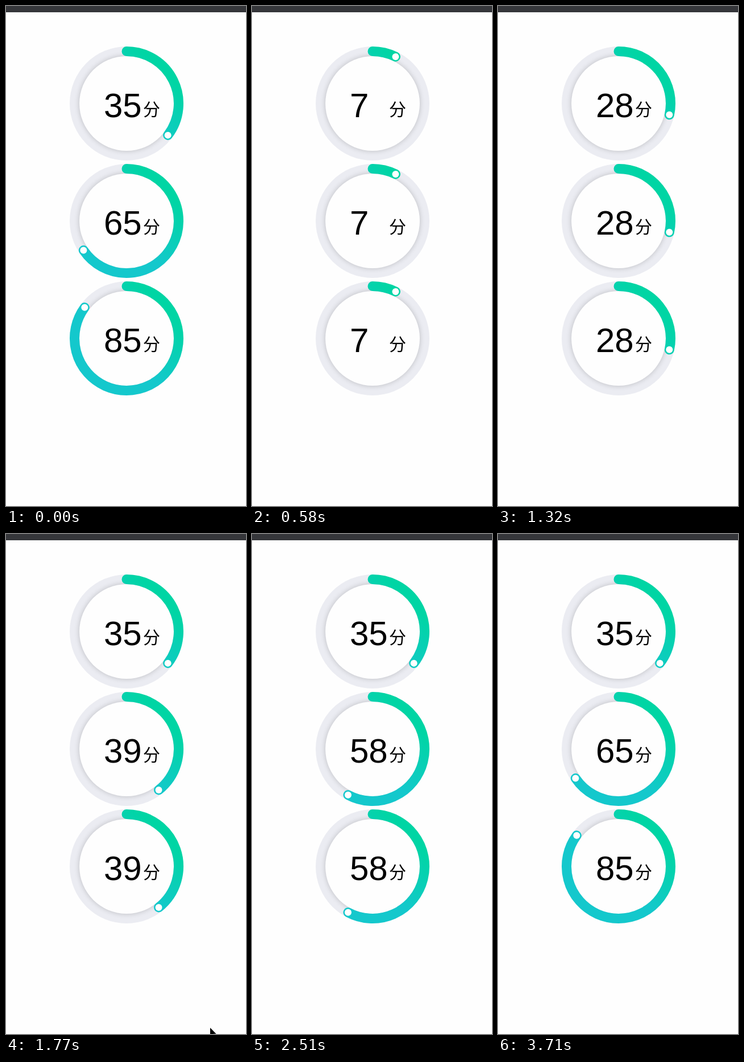
These frames come from a looping animation (422x877 px, 4.31 s). An HTML page:

```html
<!DOCTYPE html>
<html lang="zh-CN">
<head>
<meta charset="utf-8">
<title>Progress rings</title>
<style>
  html, body { margin: 0; width: 100%; height: 100%; overflow: hidden; background: #fefefe; }
  svg { display: block; }
  .num { font: 60px "Liberation Sans", Arial, sans-serif; }
  .unit { font: 30px "Noto Sans CJK SC", "Noto Sans CJK", sans-serif; }
  .tip { font: 12px Roboto, "Noto Sans CJK SC", "Noto Sans CJK", sans-serif; }
</style>
</head>
<body>
<svg id="stage" width="422" height="877" viewBox="0 0 422 877">
  <defs>
    <linearGradient id="sweep" gradientUnits="userSpaceOnUse" x1="110" y1="-10" x2="40" y2="60">
      <stop offset="0" stop-color="#00d5a4"/>
      <stop offset="1" stop-color="#14c8cc"/>
    </linearGradient>
    <filter id="soft" x="-20%" y="-20%" width="140%" height="140%">
      <feGaussianBlur stdDeviation="5"/>
    </filter>
    <filter id="halo" x="-20%" y="-80%" width="140%" height="260%">
      <feGaussianBlur stdDeviation="3"/>
    </filter>
  </defs>
  <rect width="422" height="877" fill="#fefefe"/>
  <rect width="422" height="11" fill="#35363a"/>
  <g id="rings"></g>
  <g id="status">
    <rect x="-10" y="858" width="139" height="30" rx="4" fill="#000" opacity=".25" filter="url(#halo)"/>
    <rect x="-10" y="858" width="137" height="30" rx="4" fill="#2f3737"/>
    <text class="tip" x="118" y="873" text-anchor="end" fill="#c3c8c8">等待 localhost 的响应...</text>
  </g>
  <path id="cursor" d="M359 866v15l3.4-3.2 2.2 5 2.6-1-2.2-5h4.6z" fill="#000" stroke="#fff" stroke-width="1" paint-order="stroke"/>
</svg>
<script>
const LOOP = 4310, STEPS = 25, RADIUS = 91.5;
const SHORT = [1, 4, 8, 12]; // steps that come 10 ms early
const GROWTH = [[150, 0.3], [290, 3.7], [880, 17.8], [1770, 39.4], [2510, 57.8], [3110, 72.2], [3710, 86.6]];
const $ = id => document.getElementById(id);

const stepTimes = Array.from({ length: STEPS }, (_, k) =>
  150 + 150 * k - 10 * SHORT.filter(s => s <= k).length);

function progressAt(t) {
  let i = 1;
  while (i < GROWTH.length - 1 && t > GROWTH[i][0]) i++;
  const [t0, v0] = GROWTH[i - 1], [t1, v1] = GROWTH[i];
  return v0 + (v1 - v0) * (t - t0) / (t1 - t0);
}

function makeRing(cy, limit) {
  const g = document.createElementNS("http://www.w3.org/2000/svg", "g");
  g.setAttribute("transform", `translate(212 ${cy})`);
  g.innerHTML = `
    <circle r="100" fill="#ebecf2"/>
    <circle r="83" opacity=".2" filter="url(#soft)"/>
    <circle r="83" fill="#fefefe"/>
    <path fill="none" stroke="url(#sweep)" stroke-width="17" stroke-linecap="round"/>
    <circle class="dot" r="6" fill="#fff"/>
    <text class="num" x="-40" y="24"></text>
    <text class="unit" x="29" y="21">分</text>`;
  $("rings").append(g);
  const arc = g.querySelector("path"), dot = g.querySelector(".dot"), num = g.querySelector(".num");
  return progress => {
    const v = Math.min(progress, limit);
    const a = v / 100 * 2 * Math.PI;
    const x = RADIUS * Math.sin(a), y = -RADIUS * Math.cos(a);
    arc.setAttribute("d", `M0 ${-RADIUS}A${RADIUS} ${RADIUS} 0 ${v > 50 ? 1 : 0} 1 ${x} ${y}`);
    dot.setAttribute("cx", x);
    dot.setAttribute("cy", y);
    num.textContent = v < limit ? Math.round(v) : Math.floor(limit);
  };
}

const rings = [[171, 35.4], [377, 65.5], [583, 85.1]].map(([cy, limit]) => makeRing(cy, limit));
const show = (id, on) => $(id).setAttribute("visibility", on ? "visible" : "hidden");

let last = null;
function draw(t) {
  const k = stepTimes.filter(s => s <= t).length - 1;
  if (k === last) return;
  last = k;
  const progress = k < 0 ? 100 : progressAt(stepTimes[k]);
  rings.forEach(update => update(progress));
  show("status", k === 0 || k === 1);
  show("cursor", k === 11);
}

const start = performance.now();
function tick() {
  draw((performance.now() - start) % LOOP);
  requestAnimationFrame(tick);
}
tick();
</script>
</body>
</html>
```
